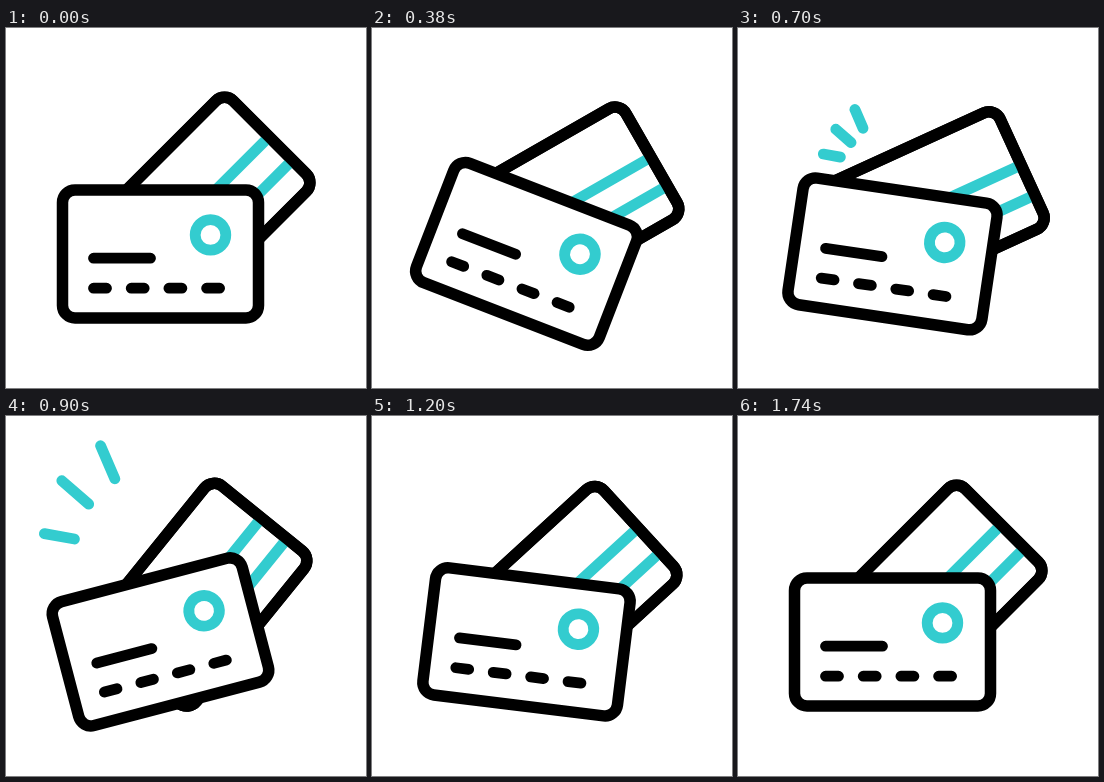
These frames come from a looping animation (360 px wide and 360 px high, 2400 ms). An HTML page:

```html
<!DOCTYPE html>
<html lang="en">
<head>
<meta charset="utf-8">
<title>Bank cards</title>
<style>
  html, body { margin: 0; height: 100%; overflow: hidden; background: #fff; }
  svg { display: block; width: 100%; height: 100%; }
  .card { fill: #fff; stroke: #000; stroke-width: 11.5; }
  .ink, .accent { fill: none; stroke-width: 10.8; }
  .ink { stroke: #000; stroke-linecap: round; }
  .accent { stroke: #33cccf; }
  #sparks { stroke-linecap: round; }
</style>
</head>
<body>
<svg viewBox="0 0 360 360">
  <defs>
    <rect id="shape" x="-98" y="-64" width="196" height="128" rx="12.5"/>
  </defs>
  <g id="back">
    <use href="#shape" class="card"/>
    <path class="accent" d="M-90-1H95M-90 32H95"/>
    <use href="#shape" class="card" style="fill:none"/>
  </g>
  <g id="front">
    <use href="#shape" class="card"/>
    <circle class="accent" cx="50" cy="-19" r="15.3"/>
    <path class="ink" d="M-67 4.3h57M-67 34.3h13m24.7 0h13m24.7 0h13m24.7 0h13"/>
  </g>
  <path id="sparks" class="accent"/>
</svg>
<script>
const LOOP = 2400, STEP = 20;
const $ = id => document.getElementById(id);

// [time in ms, swing in degrees]
const frontSwing = [[0, 0], [515, 25.5], [930, -15.3], [1190, 7.1], [1410, -4.1], [1610, 0.4], [1740, 0]];
const backSwing = [[0, 0], [645, 24], [900, -6], [1110, 5], [1290, 0], [1400, 0.6], [1740, 0]];

// inner x, y, outer x, y
const sparks = [
  [125.8, 102, 89.7, 18.5],
  [114.5, 115.8, 46.7, 56.8],
  [104, 129.4, 28.2, 115.8]
];

const mix = (a, b, k) => a + (b - a) * k;

function ease(t, from, to) {
  const k = Math.min(1, Math.max(0, (t - from) / (to - from)));
  return k * k * (3 - 2 * k);
}

function swing(keys, t) {
  const i = keys.findIndex(key => key[0] > t);
  if (i < 0) return keys[keys.length - 1][1];
  const [t0, a] = keys[i - 1], [t1, b] = keys[i];
  return mix(a, b, ease(t, t0, t1));
}

function place(id, x, y, angle) {
  $(id).setAttribute("transform", `translate(${x} ${y}) rotate(${angle})`);
}

function draw(t) {
  place("front", 154.5, 225.9, swing(frontSwing, t));
  place("back", 194.5, 178.7, swing(backSwing, t) - 45);

  // each spark is a line whose tail chases its head
  const head = ease(t, 555, 1003), tail = ease(t, 656, 1165);
  const d = head > tail ? sparks.map(([x0, y0, x1, y1]) =>
    `M${mix(x0, x1, tail)} ${mix(y0, y1, tail)}L${mix(x0, x1, head)} ${mix(y0, y1, head)}`).join("") : "";
  $("sparks").setAttribute("d", d);
}

const start = performance.now();
function tick() {
  const t = (performance.now() - start) % LOOP;
  draw(Math.floor(t / STEP) * STEP);
  requestAnimationFrame(tick);
}
tick();
</script>
</body>
</html>
```
